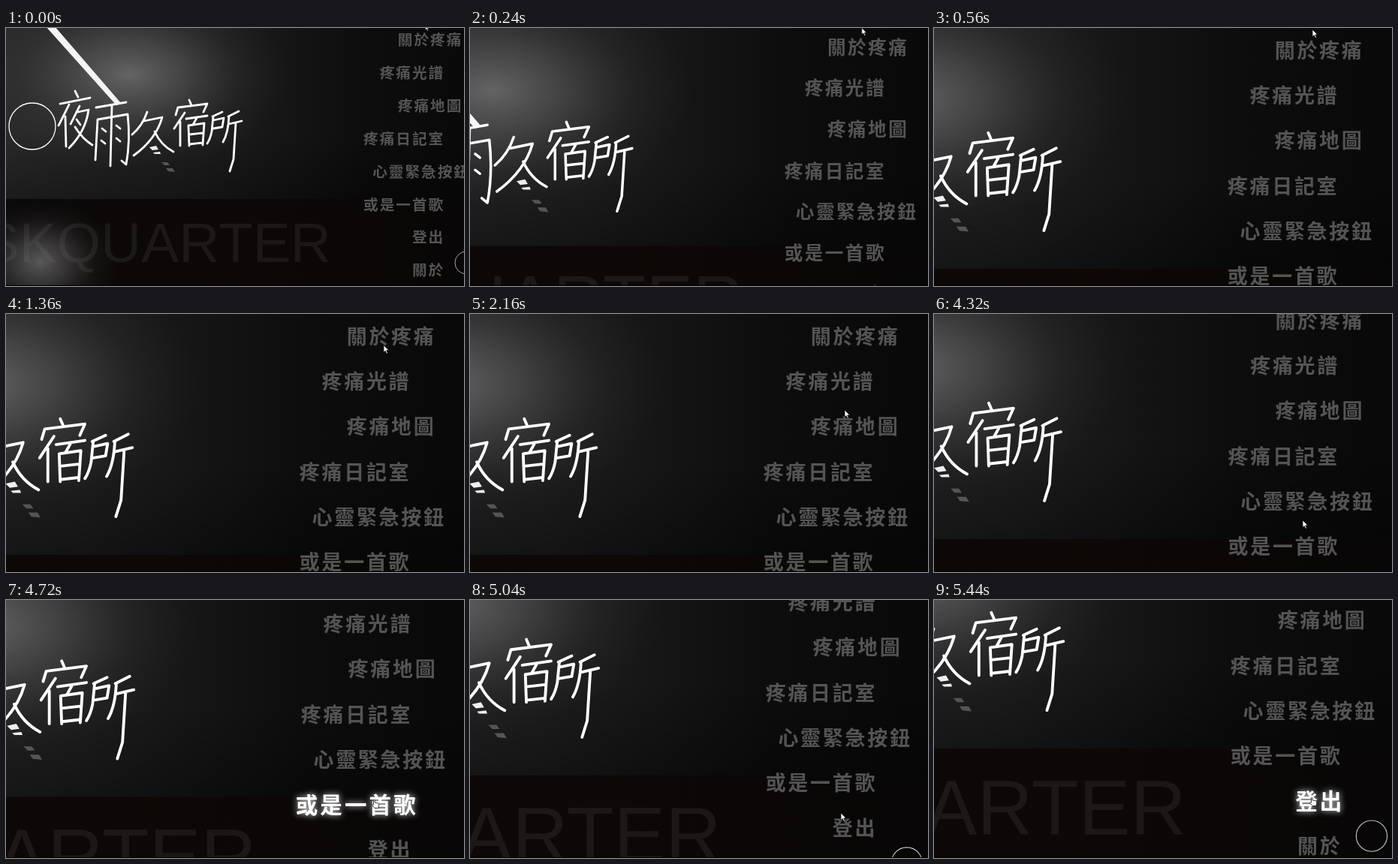
These frames come from a looping animation (610x344 px, 5520 ms). An HTML page:

```html
<!DOCTYPE html>
<html lang="zh-Hant">
<head>
<meta charset="utf-8">
<title>夜雨久宿所</title>
<style>
  html, body { margin: 0; width: 100%; height: 100%; overflow: hidden; background: #0a0a0a; }
  #stage { position: absolute; left: 0; top: 0; width: 610px; height: 344px; overflow: hidden; }
  #stage::after { content: ""; position: absolute; left: 0; bottom: 0; width: 100%; height: 1px; background: #000; }
  #cam, #page { position: absolute; left: 0; top: 0; width: 610px; height: 344px; transform-origin: 0 0; }
  svg { position: absolute; left: 0; top: 0; overflow: visible; }
  .item {
    position: absolute; white-space: nowrap; height: 40px; line-height: 40px;
    font: 700 27px/40px "Noto Sans CJK TC", "Noto Sans CJK", "Noto Sans CJK JP", sans-serif;
    letter-spacing: 2.7px;
  }
  .word { font: 75px "Liberation Sans", Arial, sans-serif; }
</style>
</head>
<body>
<div id="stage">
  <div id="cam">
    <div id="page">
      <svg width="610" height="344">
        <defs>
          <linearGradient id="wall" x1="0" x2="1" y1="0" y2="0">
            <stop offset="0" stop-color="#2a2a2a"/>
            <stop offset=".4" stop-color="#1e1e1e"/>
            <stop offset=".72" stop-color="#0d0d0d"/>
            <stop offset="1" stop-color="#080808"/>
          </linearGradient>
          <linearGradient id="dusk" x1="0" x2="0" y1="0" y2="1">
            <stop offset="0" stop-color="#000" stop-opacity="0"/>
            <stop offset="1" stop-color="#000" stop-opacity=".35"/>
          </linearGradient>
          <linearGradient id="floor" x1="0" x2="1" y1="0" y2="0">
            <stop offset="0" stop-color="#0b0909"/>
            <stop offset=".5" stop-color="#0e0807"/>
            <stop offset="1" stop-color="#070606"/>
          </linearGradient>
          <radialGradient id="glow">
            <stop offset="0" stop-color="#9a9a9a" stop-opacity=".55"/>
            <stop offset=".35" stop-color="#808080" stop-opacity=".36"/>
            <stop offset=".7" stop-color="#606060" stop-opacity=".12"/>
            <stop offset="1" stop-color="#505050" stop-opacity="0"/>
          </radialGradient>
        </defs>
        <g transform="translate(-262.8 7.9) scale(1.373)">
          <rect x="-10" y="-20" width="680" height="250" fill="url(#wall)"/>
          <ellipse cx="165" cy="62" rx="215" ry="125" fill="url(#glow)"/>
          <rect x="-10" y="140" width="680" height="90" fill="url(#dusk)"/>
          <rect x="-10" y="228" width="680" height="140" fill="url(#floor)"/>
          <ellipse cx="45" cy="312" rx="105" ry="82" fill="url(#glow)"/>
          <text class="word" x="433" y="312" text-anchor="end" fill="#999" fill-opacity=".11">DUSKQUARTER</text>
          <path d="M53-2L65-2L153 100L147 103Z" fill="#f4f4f4"/>
          <path d="M191 159l9-2 3 5-8 1z M196 166l9-1 1 3-8 0z" fill="#eee"/>
          <path d="M207 179l8 0 3 4-7 0z M213 187l9 0 3 5-9-1z" fill="#555"/>
          <g fill="none" stroke="#fff" stroke-linecap="round" stroke-linejoin="round">
            <circle cx="35" cy="131" r="31" stroke-width="1.3"/>
            <circle cx="613" cy="313" r="15" stroke-width=".8" stroke="#ccc"/>
            <g stroke-width="2.8">
              <path d="M92 84L96 92M72 101L112 93M84 102L70 130M79 118L80 158M98 104L86 128M96 112L110 109Q106 138 84 160M94 122L99 129M92 132Q102 148 115 156"/>
              <path d="M120 106L160 99M122 122L119 176M122 122L162 115Q166 150 160 182L154 177M141 104L139 184M128 134l5 4M127 150l5 4M147 130l5 4M147 147l5 4"/>
              <path d="M188 112Q182 130 168 142M184 124L208 119Q200 148 170 170M198 138Q206 156 223 165"/>
              <path d="M244 96L247 103M226 116L229 106L268 101L263 112M238 113L224 134M232 125L232 157M240 121L268 117M254 120L249 129M243 130L244 157M243 130L264 127L262 156M244 142L262 140M244 155L262 153"/>
              <path d="M288 112L275 118M276 118L274 138Q272 148 268 154M276 123L290 120L288 132L276 134M310 111L296 118M297 118Q296 140 289 152M297 128L314 124M306 127L303 175L298 191"/>
            </g>
          </g>
        </g>
      </svg>
    </div>
    <svg id="cursor" width="12" height="14" stroke="#111" stroke-width=".8" stroke-linejoin="round" fill="#fff">
      <path id="arrow" d="M0 0L0 9.5L2.2 7.6L3.8 11.2L5.4 10.4L3.8 7L6.8 6.8Z"/>
      <path id="hand" d="M1.5 .8Q2.4-.6 3.2.8L3.2 4L8 5Q9 5.4 8.8 7L8 11.5L3 11.5L-.4 7.4Q0 6 1.5 7Z"/>
    </svg>
  </div>
</div>
<script>
const LOOP = 5520, STEP = 80, ZOOM_END = 560, START_SCALE = 1 / 1.373;
const PITCH = 29.7, ROW = 60.2, TOP = 30.4;
const $ = id => document.getElementById(id);

// label, right edge
const menu = [
  ["關於疼痛", 572.5], ["疼痛光譜", 539.3], ["疼痛地圖", 572.5], ["疼痛日記室", 539.3],
  ["心靈緊急按鈕", 585.7], ["或是一首歌", 539.3], ["登出", 539.3], ["關於", 539.3]
];

// item, from, to
const hovers = [
  [1, 720, 800], [0, 800, 1360], [1, 1520, 2160], [2, 2240, 3040],
  [3, 3200, 3600], [4, 3760, 4240], [5, 4560, 5040], [6, 5360, LOOP]
];

// time, x, y
const pointer = [
  [0, 504, 2], [560, 504, 2], [640, 502, 260], [720, 503, 95], [800, 503, 38], [880, 503, 30],
  [1280, 503, 30], [1680, 503, 88], [2080, 503, 88], [2160, 499, 128], [2320, 496, 149],
  [2480, 496, 149], [2640, 490, 149], [2960, 490, 149], [3040, 490, 178], [3280, 490, 205],
  [3440, 490, 205], [3600, 490, 232], [4000, 490, 266], [4080, 490, 266], [4320, 491, 275],
  [4720, 488, 266], [5040, 494, 284], [5440, 501, 263]
];

// time, distance
const scroll = [[0, 0], [4080, 0], [4160, 5], [4320, 21], [4720, 58.5], [5440, 123]];

const clamp = v => Math.max(0, Math.min(1, v));
const mix = (a, b, p) => a + (b - a) * p;

function sample(keys, t) {
  const i = keys.findIndex(k => k[0] > t);
  if (i < 0) return keys[keys.length - 1].slice(1);
  const a = keys[i - 1], b = keys[i], p = (t - a[0]) / (b[0] - a[0]);
  return a.slice(1).map((v, n) => mix(v, b[n + 1], p));
}

const items = menu.map(([label, right], i) => {
  const el = document.createElement("div");
  el.className = "item";
  el.textContent = label;
  el.style.left = right - label.length * PITCH + "px";
  el.style.top = TOP + i * ROW - 21.5 + "px";
  $("page").append(el);
  return el;
});

function draw(t) {
  const rest = (1 - clamp(t / ZOOM_END)) ** 2;
  const scale = mix(1, START_SCALE, rest);
  $("cam").style.transform = `translate(${191.4 * rest}px, ${-5.75 * rest}px) scale(${scale})`;

  const [dist] = sample(scroll, t);
  $("page").style.transform = `translate(${dist * 0.033}px, ${-dist}px)`;

  const active = hovers.find(h => t >= h[1] && t < h[2]);
  items.forEach((el, i) => {
    const p = active && active[0] === i ? clamp((t - active[1] + STEP) / (2 * STEP)) : 0;
    const grey = Math.round(mix(84, 255, p));
    el.style.color = `rgb(${grey}, ${grey}, ${grey})`;
    el.style.transform = p ? `scale(${1 + 0.097 * p})` : "none";
    el.style.textShadow = p ? `0 0 8px rgba(255, 255, 255, ${0.85 * p})` : "none";
  });

  const [x, y] = sample(pointer, t);
  $("cursor").style.transform = `translate(${x}px, ${y}px)`;
  $("hand").style.display = active ? "" : "none";
  $("arrow").style.display = active ? "none" : "";
}

function tick() {
  draw(Math.floor((performance.now() % LOOP) / STEP) * STEP);
  requestAnimationFrame(tick);
}
tick();
</script>
</body>
</html>
```
